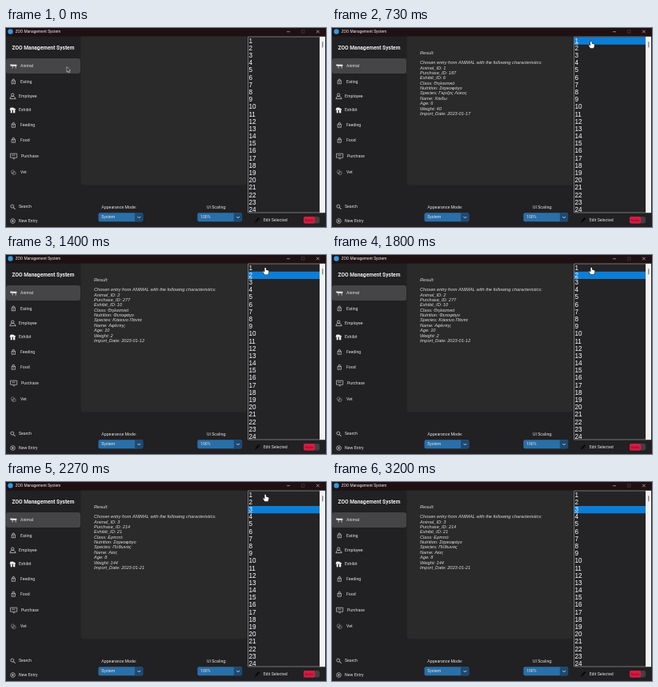
These frames come from a looping animation (400x249 px, 3270 ms). An HTML page with a canvas:

```html
<!DOCTYPE html>
<html lang="en">
<head>
<meta charset="utf-8">
<title>ZOO Management System</title>
<style>
html, body { margin: 0; width: 100%; height: 100%; overflow: hidden; background: #212023; }
canvas { display: block; width: 100vw; height: 100vh; }
</style>
</head>
<body>
<canvas id="stage"></canvas>
<script>
const W = 400, H = 249, LOOP = 3270;
const canvas = document.getElementById('stage');
const ctx = canvas.getContext('2d');
const UI = 'Roboto, sans-serif';
const ARIAL = '"Liberation Sans", Arial, sans-serif';
const ROW = 9.18, LIST_TOP = 11.6;

const records = [
  { at: 600, id: 1, purchase: 187, exhibit: 6, cls: 'Θηλαστικό', diet: 'Σαρκοφάγο',
    species: 'Γκρίζος Λύκος', name: 'Χάιδω', age: 6, weight: 40, date: '2023-01-17' },
  { at: 1000, id: 2, purchase: 277, exhibit: 10, cls: 'Θηλαστικό', diet: 'Φυτοφάγο',
    species: 'Κόκκινο Πάντα', name: 'Αφέντης', age: 10, weight: 2, date: '2023-01-12' },
  { at: 2070, id: 3, purchase: 214, exhibit: 21, cls: 'Ερπετό', diet: 'Σαρκοφάγο',
    species: 'Πύθωνας', name: 'Αίας', age: 8, weight: 144, date: '2023-01-21' }
];

// label, text x, centre y, icon
const menu = [
  ['Animal', 18, 47.8, cow], ['Eating', 18, 67, bag], ['Employee', 16, 85.4, person],
  ['Exhibit', 16, 102.8, house], ['Feeding', 18, 121.4, bag], ['Food', 18, 140.4, bag],
  ['Purchase', 19, 160.2, card], ['Vet', 18, 180.5, vet],
  ['Search', 16, 223.8, lens], ['New Entry', 16, 241.5, plus]
];

// time, x, y of the pointer tip
const path = [
  [0, 76, 48.5], [130, 76, 48.5], [430, 314, 21], [480, 314, 21],
  [600, 323.6, 17], [1000, 324.2, 16], [2700, 324.2, 15.7], [3000, 330, -14], [LOOP, 330, -14]
];

function rect(x, y, w, h, fill, r = 0) {
  ctx.fillStyle = fill;
  ctx.beginPath();
  ctx.roundRect(x, y, w, h, r);
  ctx.fill();
}

function text(s, x, y, size, color = '#e4e4e4', style = '', family = UI) {
  ctx.font = `${style} ${size}px ${family}`;
  ctx.fillStyle = color;
  ctx.fillText(s, x, y);
}

function line(points, color, width = 0.7, close = false) {
  ctx.strokeStyle = color;
  ctx.lineWidth = width;
  ctx.beginPath();
  points.forEach(([x, y], i) => i ? ctx.lineTo(x, y) : ctx.moveTo(x, y));
  if (close) ctx.closePath();
  ctx.stroke();
}

function ring(x, y, r, color = '#ddd', width = 0.7) {
  ctx.strokeStyle = color;
  ctx.lineWidth = width;
  ctx.beginPath();
  ctx.arc(x, y, r, 0, 7);
  ctx.stroke();
}

function shape(points, fill) {
  ctx.fillStyle = fill;
  ctx.beginPath();
  points.forEach(([x, y]) => ctx.lineTo(x, y));
  ctx.fill();
}

// Icons are drawn around their own centre.
function cow() {
  rect(-2, -2, 6, 2, '#eee', 0.5);
  rect(-4, -2.4, 2.6, 2, '#eee', 0.4);
  rect(-1.6, 0, 0.8, 2.6, '#ddd');
  rect(2.4, 0, 0.8, 2.6, '#ddd');
}
function bag() {
  ctx.strokeStyle = '#ccc';
  ctx.lineWidth = 0.7;
  ctx.strokeRect(-2.2, -1, 4.4, 3.8);
  line([[-1.4, -1], [-0.8, -3], [0.8, -3], [1.4, -1]], '#ccc');
  line([[0, 0], [0, 1.8]], '#ccc');
}
function person() {
  ring(-0.3, -1.8, 1.7);
  line([[-3.6, 3.2], [-2.8, 0.9], [-1.2, 0.2], [1, 0.2], [2.8, 1.4], [3.6, 3.2]], '#ddd', 0.7, true);
}
function house() {
  shape([[-4, 0], [-3, -3], [0, -3.2], [3.7, -1.4], [3, 0]], '#f4f4f4');
  rect(-2.8, 0, 2, 3.5, '#f4f4f4');
  rect(0.4, 0, 2.4, 3.5, '#f4f4f4');
}
function card() {
  line([[-3.8, -3], [4.4, -3], [4.4, 2], [-3.8, 2]], '#ccc', 0.7, true);
  line([[-2.2, -1], [2.4, -1]], '#ccc');
  line([[-0.8, 3.5], [2, 3.5]], '#ccc');
}
function vet() {
  ring(-1, -0.8, 1.9, '#888');
  ring(1, 1, 1.9, '#999');
  line([[-2.8, 1], [0, 3.2]], '#888');
}
function lens() {
  ring(-0.7, -0.7, 2);
  line([[0.8, 0.8], [3, 3]], '#eee', 1);
}
function plus() {
  ring(0, 0, 2.8);
  line([[-1.4, 0], [1.4, 0]], '#ddd');
  line([[0, -1.4], [0, 1.4]], '#ddd');
}

function titleBar() {
  rect(0, 0, W, 10.5, '#1f1113');
  ctx.fillStyle = '#2f9be0';
  ctx.beginPath();
  ctx.arc(5.5, 4.5, 3.2, 0, 7);
  ctx.fill();
  text('ZOO Management System', 11.7, 5, 4.85, '#eee');
  line([[351, 4.7], [355, 4.7]], '#ccc', 0.6);
  line([[369.5, 2.7], [373, 2.7], [373, 6.3], [369.5, 6.3]], '#544', 0.6, true);
  line([[388, 2.7], [391.6, 6.3]], '#ddd', 0.6);
  line([[391.6, 2.7], [388, 6.3]], '#ddd', 0.6);
}

function sidebar() {
  text('ZOO Management System', 7.6, 24.8, 6.62, '#eee', 'bold');
  rect(0, 38, 93, 19, '#454447', 3);
  for (const [label, x, y, icon] of menu) {
    ctx.save();
    ctx.translate(x < 17 ? 8.5 : 9.3, y);
    icon();
    ctx.restore();
    text(label, x, y, 5.2);
  }
}

function dropdown(x, label, value, labelX) {
  text(label, labelX, 224.6, 5.25);
  rect(x, 231.3, 55.8, 11, '#2a6fa8', 2);
  rect(x + 45.5, 231.3, 10.3, 11, '#1d4a72', [0, 2, 2, 0]);
  text(value, x + 3.7, 236.9, 5.2);
  line([[x + 49, 236], [x + 50.8, 237.8], [x + 52.6, 236]], '#e4e4e4', 0.9);
}

function result(r) {
  const lines = ['Result:', '', 'Chosen entry from ANIMAL with the following characteristics:',
    'Animal_ID: ' + r.id, 'Purchase_ID: ' + r.purchase, 'Exhibit_ID: ' + r.exhibit,
    'Class: ' + r.cls, 'Nutrition: ' + r.diet, 'Species: ' + r.species, 'Name: ' + r.name,
    'Age: ' + r.age, 'Weight: ' + r.weight, 'Import_Date: ' + r.date];
  lines.forEach((s, i) => text(s, 110, 31 + i * 6.36, 5.65, '#dedede', 'italic', ARIAL));
}

function list(selected) {
  rect(302.5, 10.8, 89.5, 220.4, '#c8c8c8');
  rect(303, 11.3, 89, 219.4, '#242326');
  rect(392, 10.8, 7, 220.4, '#f2f2f2');
  rect(395, 17, 1.4, 7.5, '#8a8a8a', 0.7);
  if (selected) rect(303, LIST_TOP + (selected - 1) * ROW, 89, ROW, '#0c7ed6');
  for (let n = 1; n <= 24; n++) {
    const y = LIST_TOP + (n - 0.5) * ROW;
    text(n, 303.4, y + 0.3, 8.2, '#fff', '', ARIAL);
    if (n === selected) line([[303.5, y + 3.9], [308, y + 3.9]], '#fff', 0.6);
  }
}

function footer() {
  line([[312, 242.5], [316.5, 237.8]], '#080808', 2);
  line([[310.5, 244.2], [312, 242.5]], '#111', 0.9);
  text('Edit Selected', 321.7, 240.2, 5.2);
  rect(372, 236, 20, 8.5, '#404044', 2);
  rect(372, 236, 14.3, 8.5, '#d91a40', 2);
  text('Delete', 373.6, 240.4, 3.8, '#6b0a1c');
}

function pointer(t) {
  const i = path.findIndex(p => p[0] > t);
  const [t0, x0, y0] = path[i - 1], [t1, x1, y1] = path[i];
  const u = (t - t0) / (t1 - t0), e = u * u * (3 - 2 * u);
  const x = x0 + (x1 - x0) * e, y = y0 + (y1 - y0) * e;
  ctx.save();
  ctx.translate(x, y);
  if (x < 302) {
    const arrow = [[0, 0], [0, 6.6], [1.5, 5.3], [2.5, 7.5], [3.5, 7], [2.6, 5], [4.5, 4.8]];
    shape(arrow, '#222');
    line(arrow, '#e8e8e8', 0.6, true);
  } else {
    const hand = [[-0.8, 0], [0.8, 0], [0.9, 2.7], [4, 3.5], [4.3, 5.5], [3.2, 8.5],
      [-0.8, 8.5], [-3, 5], [-2.2, 4.4], [-0.8, 5.4]];
    line(hand, '#111', 1, true);
    shape(hand, '#fff');
  }
  ctx.restore();
}

function draw(t) {
  const current = records.filter(r => t >= r.at).pop();
  rect(0, 0, W, H, '#212023');
  rect(93.5, 10, 207.5, 186.5, '#2a2a2b', [0, 0, 4, 4]);
  titleBar();
  sidebar();
  dropdown(115.5, 'Appearance Mode:', 'System', 119.3);
  dropdown(239.3, 'UI Scaling:', '100%', 251);
  if (current) result(current);
  list(current ? current.id : 0);
  footer();
  pointer(t);
}

function frame() {
  const dpr = window.devicePixelRatio || 1;
  const w = Math.round(innerWidth * dpr), h = Math.round(innerHeight * dpr);
  if (canvas.width !== w || canvas.height !== h) {
    canvas.width = w;
    canvas.height = h;
  }
  ctx.setTransform(w / W, 0, 0, h / H, 0, 0);
  ctx.textBaseline = 'middle';
  draw(performance.now() % LOOP);
  requestAnimationFrame(frame);
}
frame();
</script>
</body>
</html>
```
